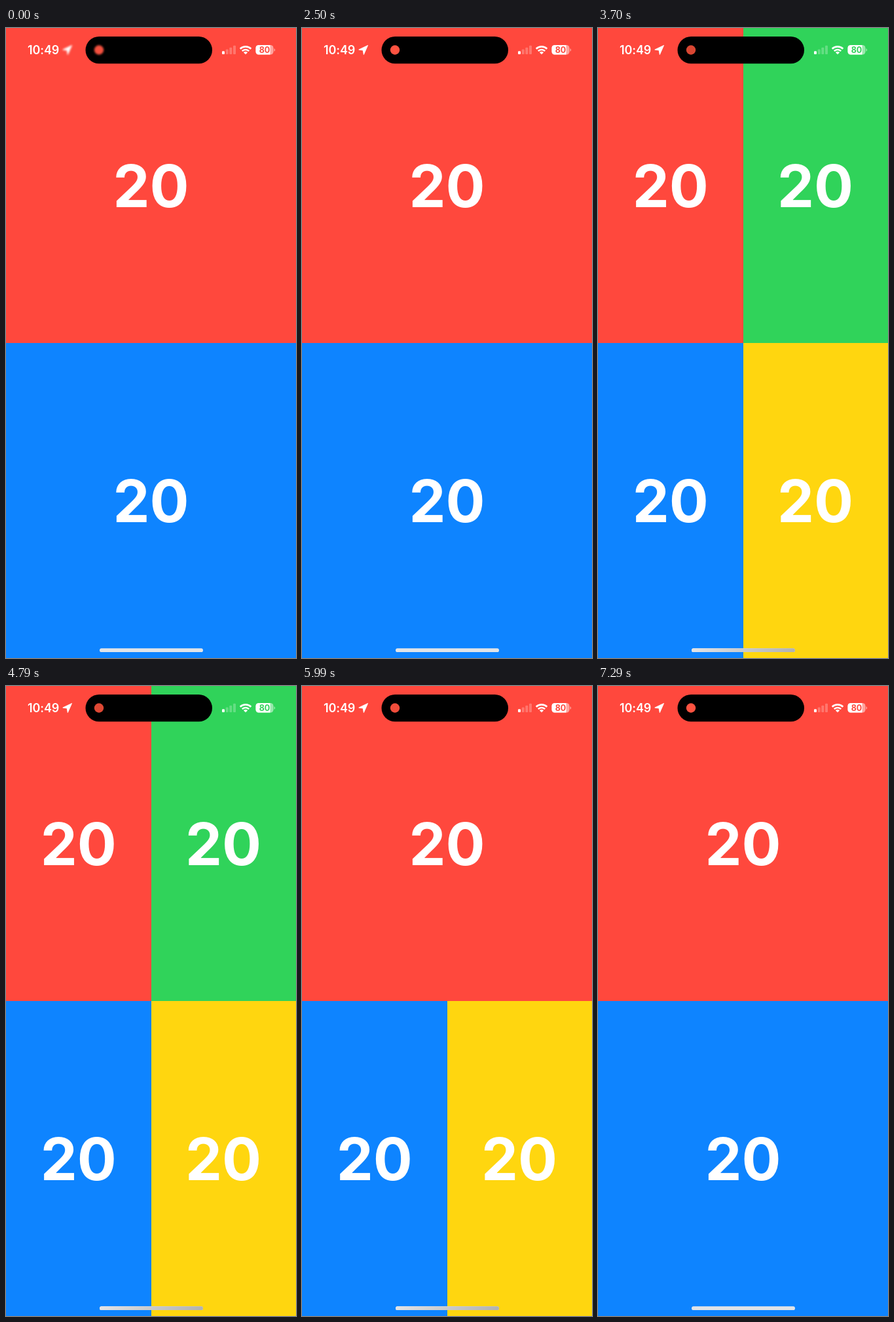
Animation of 443 by 960 pixels, one loop 7.39 s. Source, as an HTML page:

```html
<!DOCTYPE html>
<html lang="en">
<head>
<meta charset="utf-8">
<title>Counter tiles</title>
<style>
  html, body { margin: 0; width: 100%; height: 100%; overflow: hidden; background: #ff483d; }
  svg { display: block; width: 443px; height: 960px; }
  text { font-family: Inter, Roboto, sans-serif; font-weight: 700; fill: #fff; }
  .count { font-size: 89px; text-anchor: middle; }
  .clock { font-size: 18px; font-weight: 600; letter-spacing: -.1px; }
  .level { font-size: 12.5px; text-anchor: middle; fill: #ff483d; animation-name: tint; }
  .anim { animation-duration: 7390ms; animation-timing-function: step-end; animation-iteration-count: infinite; }
  .green { opacity: 0; animation-name: top-show; }
  .yellow { opacity: 0; animation-name: bottom-show; }
  .red-count { animation-name: top-shift; }
  .blue-count { animation-name: bottom-shift; }
  .focus { animation-name: focus; }
  .dot { animation-name: glow; animation-timing-function: linear; }

  /* Top row splits at 2.6 s and joins at 4.89 s; bottom row at 3.7 s and 6.09 s. */
  @keyframes top-show { 0%, 66.1% { opacity: 0 } 35.12% { opacity: 1 } 100% { opacity: 0 } }
  @keyframes bottom-show { 0%, 82.34% { opacity: 0 } 50% { opacity: 1 } 100% { opacity: 0 } }
  @keyframes top-shift {
    0%, 66.1%, 100% { transform: translateX(0) }
    35.12% { transform: translateX(-110.75px) }
  }
  @keyframes bottom-shift {
    0%, 82.34%, 100% { transform: translateX(0) }
    50% { transform: translateX(-110.75px) }
  }
  @keyframes tint { 0%, 66.1%, 100% { fill: #ff483d } 35.12% { fill: #30d35a } }
  @keyframes focus {
    0% { filter: blur(1.5px) }
    1.34% { filter: blur(.6px) }
    1.61%, 100% { filter: none }
  }
  @keyframes glow {
    0% { fill: #f3503e }
    13.5%, 33.8% { fill: #ff5341 }
    48.7% { fill: #d94632 }
    64.8% { fill: #de4834 }
    81% { fill: #f04d3b }
    98.6%, 100% { fill: #ff5341 }
  }
</style>
</head>
<body>
<svg viewBox="0 0 443 960">
  <defs>
    <linearGradient id="bar">
      <stop offset="0" stop-color="#e2e3e6"/>
      <stop offset=".5" stop-color="#c9cacc"/>
      <stop offset="1" stop-color="#b2b2b0"/>
    </linearGradient>
  </defs>

  <rect width="443" height="480" fill="#ff483d"/>
  <rect y="480" width="443" height="480" fill="#0e84ff"/>
  <text class="count anim red-count" x="221.5" y="273">20</text>
  <text class="count anim blue-count" x="221.5" y="753">20</text>

  <g class="anim green">
    <rect x="222" width="221" height="480" fill="#30d35a"/>
    <text class="count" x="332" y="273">20</text>
  </g>
  <g class="anim yellow">
    <rect x="222" y="480" width="221" height="480" fill="#ffd60f"/>
    <text class="count" x="332" y="753">20</text>
  </g>

  <!-- status bar -->
  <text class="clock" x="33" y="40">10:49</text>
  <path class="anim focus" fill="#fff" stroke="#fff" stroke-linejoin="round"
        d="M100.5 26.5 L86.8 33 L93.3 34 L94.3 40.5 Z"/>
  <rect x="121.5" y="13" width="193.5" height="41.3" rx="20.6"/>
  <g class="anim focus"><circle class="anim dot" cx="142" cy="33.5" r="7.2"/></g>

  <g fill="#fff">
    <rect x="330" y="35.2" width="4" height="4.8" rx="1.1"/>
    <g opacity=".25">
      <rect x="335.7" y="32.6" width="4" height="7.4" rx="1.1"/>
      <rect x="341.3" y="29.7" width="4" height="10.3" rx="1.1"/>
      <rect x="347" y="26.7" width="4" height="13.3" rx="1.1"/>
    </g>
    <path d="M366 40.3 L362.9 37.2 A4.4 4.4 0 0 1 369.1 37.2 Z"/>
    <g fill="none" stroke="#fff" stroke-width="2.6">
      <path d="M360.8 35.1 A7.4 7.4 0 0 1 371.2 35.1"/>
      <path d="M357.7 31.7 A11.9 11.9 0 0 1 374.3 31.7"/>
    </g>
    <rect x="381.5" y="26" width="27" height="14.5" rx="4.5" opacity=".5"/>
    <path d="M386 26 H403.5 V40.5 H386 A4.5 4.5 0 0 1 381.5 36 V30.5 A4.5 4.5 0 0 1 386 26 Z"/>
    <path d="M409.5 31 A2.6 2.6 0 0 1 409.5 35.8 Z" opacity=".5"/>
  </g>
  <text class="level anim" x="395" y="37.8">80</text>

  <!-- home indicator -->
  <rect x="143" y="945.3" width="158" height="5.8" rx="2.9" fill="#e1e4e8"/>
  <rect class="anim yellow" x="143" y="945.3" width="158" height="5.8" rx="2.9" fill="url(#bar)"/>
</svg>
</body>
</html>
```
